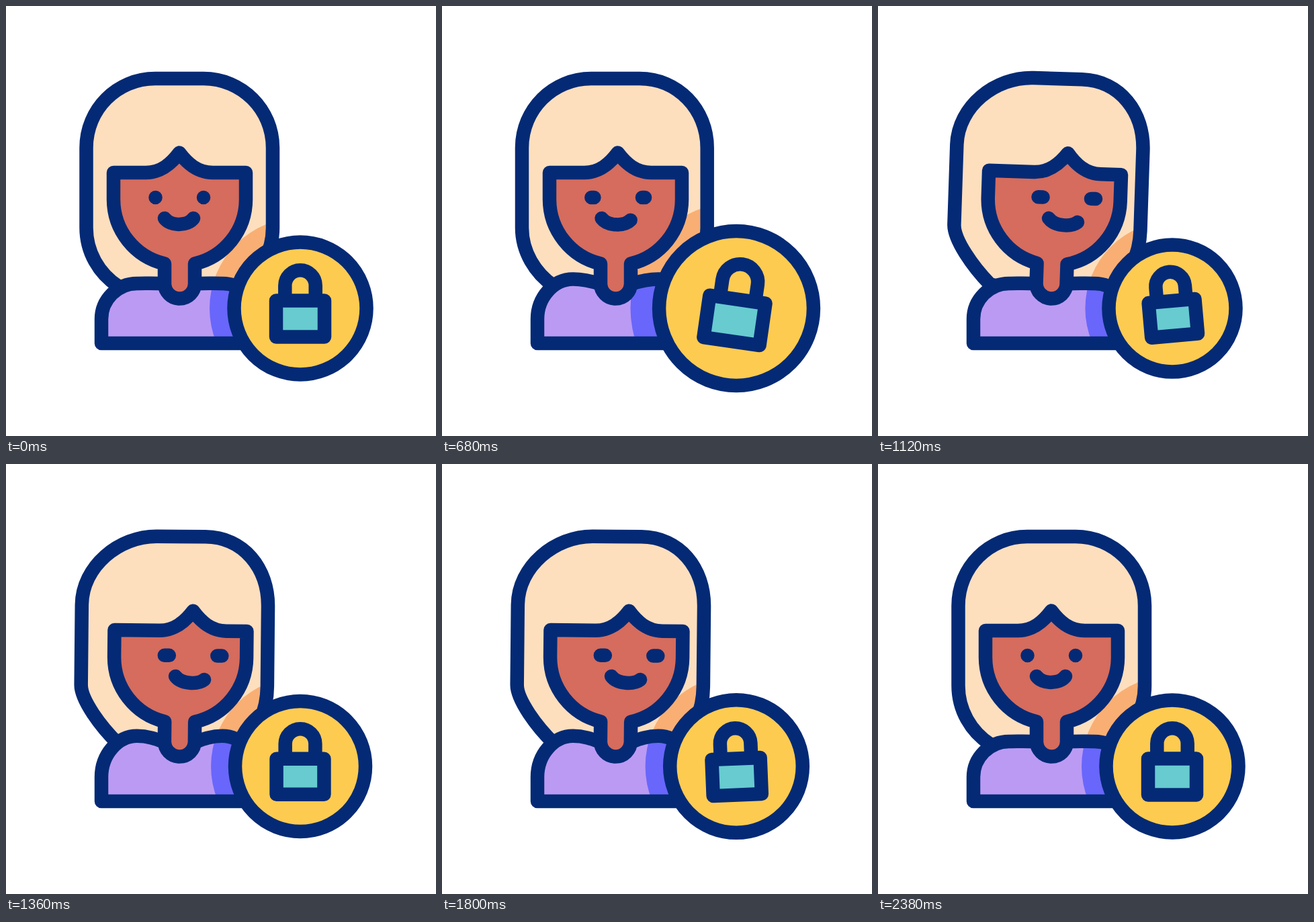
Write an HTML page that moves like this. It is 640 px wide and 640 px high and loops after 2400 ms.

```html
<!DOCTYPE html>
<html lang="en">
<head>
<meta charset="utf-8">
<title>Avatar with lock</title>
<style>
  html, body { margin: 0; width: 100%; height: 100%; overflow: hidden; background: #fff; }
  svg { display: block; width: 100%; height: 100%; }
  .line { fill: none; stroke: #042a75; stroke-width: 20.5; stroke-linecap: round; stroke-linejoin: round; }
</style>
</head>
<body>
<svg viewBox="0 0 640 640">
  <defs>
    <clipPath id="hairClip"><path class="hair turn"/></clipPath>
    <clipPath id="bodyClip"><path class="body"/></clipPath>
  </defs>
  <path class="hair turn" fill="#fddfbe"/>
  <g clip-path="url(#hairClip)"><circle class="shade" cx="438" cy="450" fill="#f9af73"/></g>
  <path class="hair turn line"/>
  <path class="body" fill="#bb9af3"/>
  <g clip-path="url(#bodyClip)"><circle class="shade" cx="438" cy="450" fill="#6966fb"/></g>
  <path class="body line"/>
  <g class="turn">
    <path class="face line" style="fill:#d56c5d"/>
    <path class="eyes line"/>
    <path class="mouth line"/>
  </g>
  <circle class="disc line" cx="438" cy="450" style="fill:#fecb51"/>
  <g id="lock" class="line">
    <path d="M-22.7 -12V-34a22.7 22.7 0 0 1 45.4 0V-12"/>
    <path d="M-36 -11.5H36V42.5H-36Z" fill="#67cbd0"/>
  </g>
</svg>
<script>
const LOOP = 2400, STEP = 20;
const set = (name, attr, value) =>
  document.querySelectorAll('.' + name).forEach(el => el.setAttribute(attr, value));
const mix = (a, b, k) => a + (b - a) * k;
const lock = document.getElementById('lock');

function ease(t, from, to) {
  const x = Math.min(1, Math.max(0, (t - from) / (to - from)));
  return x * x * (3 - 2 * x);
}

// Rises to 1 at the centre and is 0 outside the given reach.
const bump = (t, centre, reach) => 1 - ease(Math.abs(t - centre), 0, reach);

// Damped swing that starts downwards and dies out before the loop ends.
function ring(t, from, half) {
  const d = Math.max(0, t - from);
  return -Math.exp(-d / 2200) * Math.sin(Math.PI * d / half) * (1 - ease(t, 1800, 2380));
}

function hairPath(dl, dr) {
  const l = 119.5 + dl, r = 397 + dr, lift = Math.min(0, dl);
  return `M222 108H294C351 108 ${r} 154 ${r} 211V330`
    + `C${r} 366 ${378.5 + dr / 2} 398 349.5 417L258 440L167 417`
    + `C${138 + Math.abs(dl) / 3} ${398 + lift * .7} ${l} ${366 + lift * 1.6} ${l} 330`
    + `V211C${l} 154 165 108 222 108Z`;
}

function bodyPath(h) {
  const y = 413 - h, side = 437 - h / 2, neck = 412 - h / 4;
  return `M142 502V466C142 ${side} 166 ${y} 195 ${y}C212 ${y} 225 ${neck} 236 414`
    + `H281C292 ${neck} 305 ${y} 322 ${y}C351 ${y} 375 ${side} 375 466V502Z`;
}

function facePath(dx) {
  const x = 258 + dx;
  return `M160 248H${x - 50}C${x - 27} 248 ${x - 12} 234.5 ${x} 218.5`
    + `C${x + 12} 234.5 ${x + 27} 248 ${x + 50} 248H357V288A98.5 98.5 0 0 1 281 383.6`
    + `V413A22.5 22.5 0 0 1 236 413V383.6A98.5 98.5 0 0 1 160 288Z`;
}

function draw(t) {
  // Head looks left, swings to the right, then returns to the middle.
  const back = 1 - ease(t, 1880, 2370);
  const away = ease(t, 100, 400) * back;
  const swing = ease(t, 400, 900);
  const pose = (left, right) => away * mix(left, right, swing);
  const jolt = bump(t, 1120, 240);

  set('hair', 'd', hairPath(pose(11, -8.5), pose(7, -8.8)));
  set('body', 'd', bodyPath(8.2 * ease(t, 400, 800) * (1 - jolt) * back));
  set('face', 'd', facePath(pose(-18, 18.7)));

  const e = pose(-18, 12.2), w = pose(0, 7) + .01;
  set('eyes', 'd', `M${222.5 + e} 285h${w}M${294 + e + w} 285h${w}`);

  const m = pose(-18, 15.3), tip = pose(0, 4.6);
  set('mouth', 'd', `M${236 + m} 316C${245 + m} 328 ${270 + m} 328 ${279 + m} ${316 + tip}`);

  const tilt = .55 * ease(t, 680, 1000) * back + 1.35 * jolt;
  set('turn', 'transform', `rotate(${tilt} 258.5 400)`);

  // The badge swells slowly, snaps back and rings.
  const swell = ease(t, 100, 1060) * (1 - ease(t, 930, 1080));
  const s = 1 + .255 * swell + .053 * ring(t, 1000, 405);
  const angle = 11 * swell ** .7 + 6 * ring(t, 990, 370);
  set('disc', 'r', 98.5 * s);
  set('shade', 'r', 135 * s);
  lock.setAttribute('transform', `translate(438 450) rotate(${angle}) scale(${s})`);
  lock.style.strokeWidth = 20.5 / s;
}

const start = performance.now();
function frame(now) {
  const t = Math.max(0, now - start) % LOOP;
  draw(Math.floor(t / STEP) * STEP);
  requestAnimationFrame(frame);
}
draw(0);
requestAnimationFrame(frame);
</script>
</body>
</html>
```
